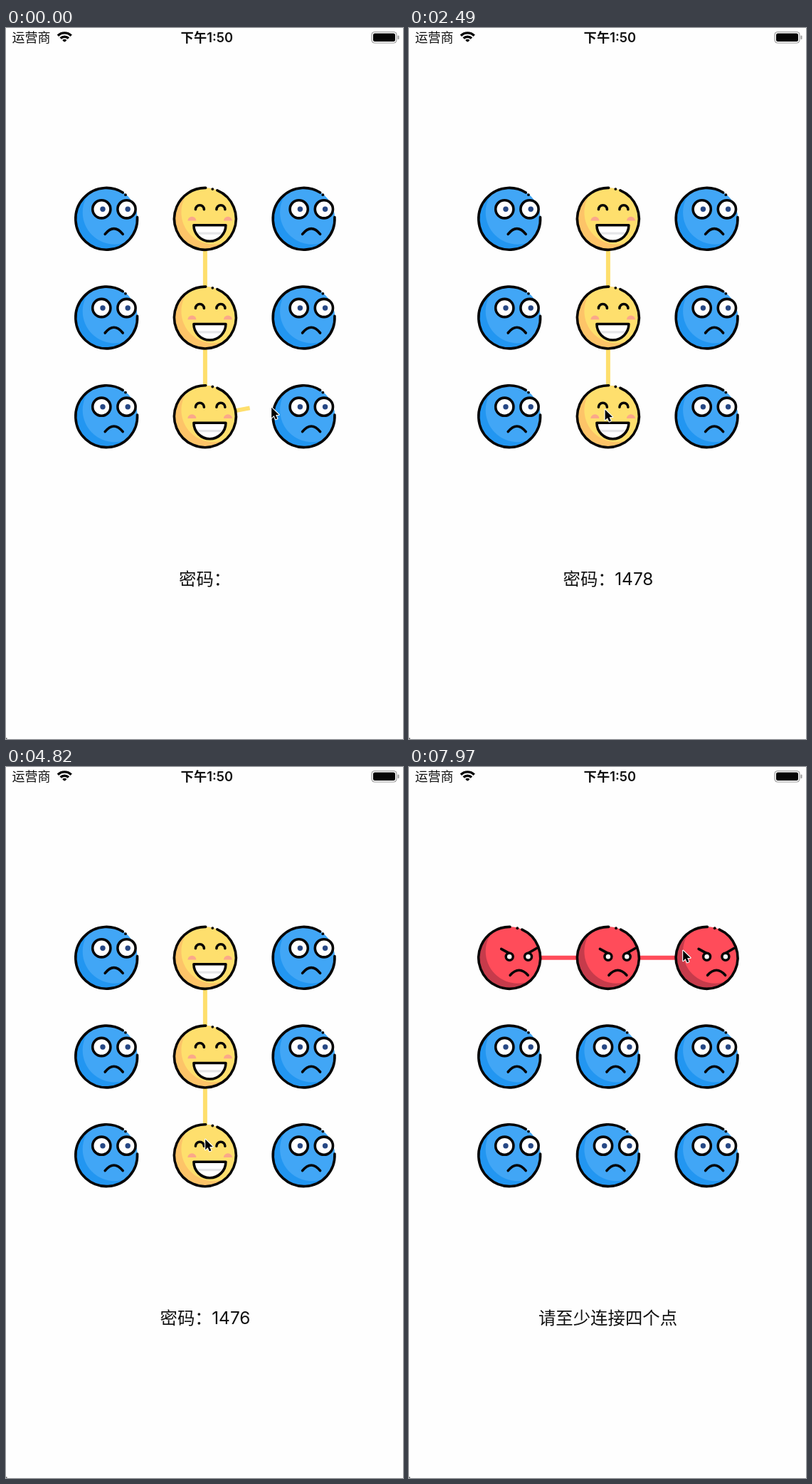
These frames come from a looping animation (558x998 px, 8 s). An HTML page with a canvas:

```html
<!DOCTYPE html>
<html lang="zh-CN">
<head>
<meta charset="utf-8">
<title>手势密码</title>
<style>
html, body { margin: 0; width: 100%; height: 100%; overflow: hidden; background: #fefefe; }
canvas { display: block; }
</style>
</head>
<body>
<canvas id="stage" width="558" height="998"></canvas>
<script>
const ctx = document.getElementById('stage').getContext('2d');
const TAU = Math.PI * 2;
const LOOP = 8000;
const UPDATE = 60;
const TOUCH_LAG = 60;
const NODE_RADIUS = 45;
const FONT = 'Inter, "Noto Sans CJK SC", "Noto Sans CJK", sans-serif';
const INK = '#060606';
const COLORS = {
  sad: { main: '#41a6f6', shade: '#2296f1' },
  happy: { main: '#fedf6d', shade: '#fdc468' },
  angry: { main: '#ff4c5a', shade: '#c63b4b' }
};

const linear = p => p;
const easeOut = p => 1 - (1 - p) ** 2.4;
const easeInOut = p => p < 0.5 ? 4 * p ** 3 : 1 - 4 * (1 - p) ** 3;

const nodeAt = i => [141.2 + i % 3 * 138.7, 267.8 + Math.floor(i / 3) * 138.7];

// Each move runs from where the last one ended; via bends the path.
const MOVES = [
  { start: -600, end: -200, to: [282, 536] },
  { start: -120, end: 200, to: [464, 528], ease: linear },
  { start: 860, end: 1610, to: [277, 255], via: [150, 290] },
  { start: 1670, end: 2310, to: [277, 535] },
  { start: 2490, end: 2840, to: [141, 543] },
  { start: 3440, end: 4240, to: [280, 271] },
  { start: 4300, end: 4820, to: [280, 522] },
  { start: 6070, end: 6870, to: [182, 256], via: [60, 225] },
  { start: 6930, end: 7560, to: [385, 257], ease: easeOut }
];

// A pattern of fewer than four nodes turns red until it is cleared.
const GESTURES = [
  { press: -700, release: 380, clear: 380 },
  { press: 1670, release: 3260, clear: 3260 },
  { press: 4230, release: 5120, clear: 6130 },
  { press: 6740, release: 7970, clear: LOOP }
];

function pointerAt(t) {
  let pos = nodeAt(1);
  for (const { start, end, to, via, ease = easeInOut } of MOVES) {
    const updates = Math.round((end - start) / UPDATE);
    const step = Math.floor((t - start) / (end - start) * updates + 0.2);
    if (step < 0) break;
    const s = ease(Math.min(1, (step + 1) / (updates + 1)));
    pos = pos.map((from, axis) => {
      const bend = via ? via[axis] : (from + to[axis]) / 2;
      return (1 - s) ** 2 * from + 2 * s * (1 - s) * bend + s * s * to[axis];
    });
  }
  return pos;
}

const touchAt = t => pointerAt(t - TOUCH_LAG);

function pickedNodes({ press, release }, t) {
  const picked = new Set();
  for (let s = press; s <= Math.min(t, release); s += 10) {
    const [x, y] = touchAt(s);
    for (let i = 0; i < 9; i++) {
      const [nx, ny] = nodeAt(i);
      if (Math.hypot(x - nx, y - ny) < NODE_RADIUS) picked.add(i);
    }
  }
  return [...picked];
}

function disc(x, y, r, color) {
  ctx.beginPath();
  ctx.arc(x, y, r, 0, TAU);
  ctx.fillStyle = color;
  ctx.fill();
}

function arc(x, y, r, from, to) {
  ctx.beginPath();
  ctx.arc(x, y, r, from, to);
  ctx.stroke();
}

function pill(x, y, w, h, r, color) {
  ctx.beginPath();
  ctx.roundRect(x, y, w, h, r);
  ctx.fillStyle = color;
  ctx.fill();
}

function segment(x1, y1, x2, y2) {
  ctx.beginPath();
  ctx.moveTo(x1, y1);
  ctx.lineTo(x2, y2);
  ctx.stroke();
}

function frown(x, y, height) {
  ctx.beginPath();
  ctx.moveTo(x - 12.5, y);
  ctx.quadraticCurveTo(x, y - 2 * height, x + 12.5, y);
  ctx.stroke();
}

function rim(gapStart, gapEnd, dot) {
  const rad = Math.PI / 180;
  arc(0, 0, 43.4, gapEnd * rad, gapStart * rad + TAU);
  disc(43 * Math.cos(dot * rad), 43 * Math.sin(dot * rad), 1.9, INK);
}

const FEATURES = {
  sad() {
    rim(-58, -3, -51.5);
    for (const x of [-6.9, 28.3]) {
      disc(x, -13.5, 12.6, '#fff');
      arc(x, -13.5, 12.6, 0, TAU);
      disc(x + 1.7, -13.5, 3.7, '#264784');
    }
    frown(10.5, 21.5, 7.7);
  },
  happy() {
    rim(-89, -67, -76);
    for (const x of [-18.5, 32]) {
      ctx.beginPath();
      ctx.ellipse(x, 2.8, 6, 5.8, 0, Math.PI, TAU);
      ctx.fillStyle = '#fba88a';
      ctx.fill();
    }
    for (const x of [-7.5, 22]) arc(x, -13, 6, Math.PI, TAU);
    ctx.beginPath();
    ctx.arc(6.5, 9, 22.5, 0, Math.PI);
    ctx.closePath();
    ctx.fillStyle = '#fff';
    ctx.fill();
    ctx.fillStyle = '#e5e6e8';
    ctx.fillRect(-12.5, 18.8, 38, 3.2);
    ctx.stroke();
  },
  angry() {
    rim(-89, -66, -75);
    segment(-11.5, -12.5, 4, -4);
    segment(23, -4.5, 38.5, -13.5);
    for (const x of [0, 26.3]) {
      disc(x, -1.5, 6.7, INK);
      disc(x, -1.5, 3.2, '#fff');
    }
    frown(13.5, 24.5, 7);
  }
};

function drawFace(x, y, mood) {
  const { main, shade } = COLORS[mood];
  ctx.save();
  ctx.translate(x, y);
  disc(0, 0, 43.5, shade);
  ctx.save();
  ctx.clip();
  disc(11.5, -9, 45, main);
  ctx.restore();
  ctx.strokeStyle = INK;
  ctx.lineWidth = 3.6;
  ctx.lineCap = ctx.lineJoin = 'round';
  FEATURES[mood]();
  ctx.restore();
}

function drawText(text, x, y, font, align = 'left') {
  ctx.font = font + ' ' + FONT;
  ctx.textAlign = align;
  ctx.fillStyle = '#111';
  ctx.fillText(text, x, y);
}

function drawStatusBar() {
  drawText('运营商', 8.5, 20, '18px');
  drawText('下午1:50', 282.3, 20, '600 18.3px', 'center');

  ctx.strokeStyle = INK;
  ctx.lineWidth = 3.4;
  for (const r of [13.3, 8, 2.7]) arc(82.3, 20.2, r, -Math.PI * 0.75, -Math.PI * 0.25);

  pill(513.4, 4.9, 36.2, 16.7, 5, '#9b9b9b');
  pill(514.6, 6.1, 33.8, 14.3, 4, '#fefefe');
  pill(516, 7.5, 31, 11.5, 2.5, INK);
  pill(550.5, 10.5, 2, 5.5, 1, '#9b9b9b');
}

function drawMessage(t) {
  if (t >= 5120) return drawText('请至少连接四个点', 279.5, 782, '24.4px', 'center');
  const code = t < 380 ? '' : t < 3260 ? '1478' : '1476';
  const x = code ? 216.5 : 243;
  drawText('密码：', x, 782, '24.4px');
  drawText(code, x + 72.7, 782, '24.4px');
}

function drawPointer([x, y]) {
  ctx.save();
  ctx.translate(x + 0.2, y + 0.7);
  ctx.beginPath();
  for (const [px, py] of [[0, 0], [0, 14.5], [3.4, 11.4], [5.7, 16.6], [8.2, 15.5], [5.9, 10.4], [10.4, 10.2]]) {
    ctx.lineTo(px, py);
  }
  ctx.closePath();
  ctx.strokeStyle = '#fff';
  ctx.lineWidth = 2.2;
  ctx.lineJoin = 'round';
  ctx.stroke();
  ctx.fillStyle = '#000';
  ctx.fill();
  ctx.restore();
}

function drawPattern(t) {
  const gesture = GESTURES.find(g => t >= g.press && t < g.clear);
  const picked = gesture ? pickedNodes(gesture, t) : [];
  const dragging = gesture && t < gesture.release;
  const mood = dragging ? 'happy' : 'angry';

  const points = picked.map(nodeAt);
  if (dragging) points.push(touchAt(t));
  ctx.strokeStyle = COLORS[mood].main;
  ctx.lineWidth = 6;
  ctx.lineJoin = 'round';
  ctx.beginPath();
  points.forEach(p => ctx.lineTo(...p));
  ctx.stroke();

  for (let i = 0; i < 9; i++) drawFace(...nodeAt(i), picked.includes(i) ? mood : 'sad');
}

function render() {
  const t = performance.now() % LOOP;
  ctx.fillStyle = '#fefefe';
  ctx.fillRect(0, 0, 558, 998);
  drawStatusBar();
  drawPattern(t);
  drawMessage(t);
  drawPointer(pointerAt(t));
  ctx.fillStyle = '#555';
  ctx.fillRect(0, 996.5, 1.5, 1.5);
  requestAnimationFrame(render);
}
render();
</script>
</body>
</html>
```
